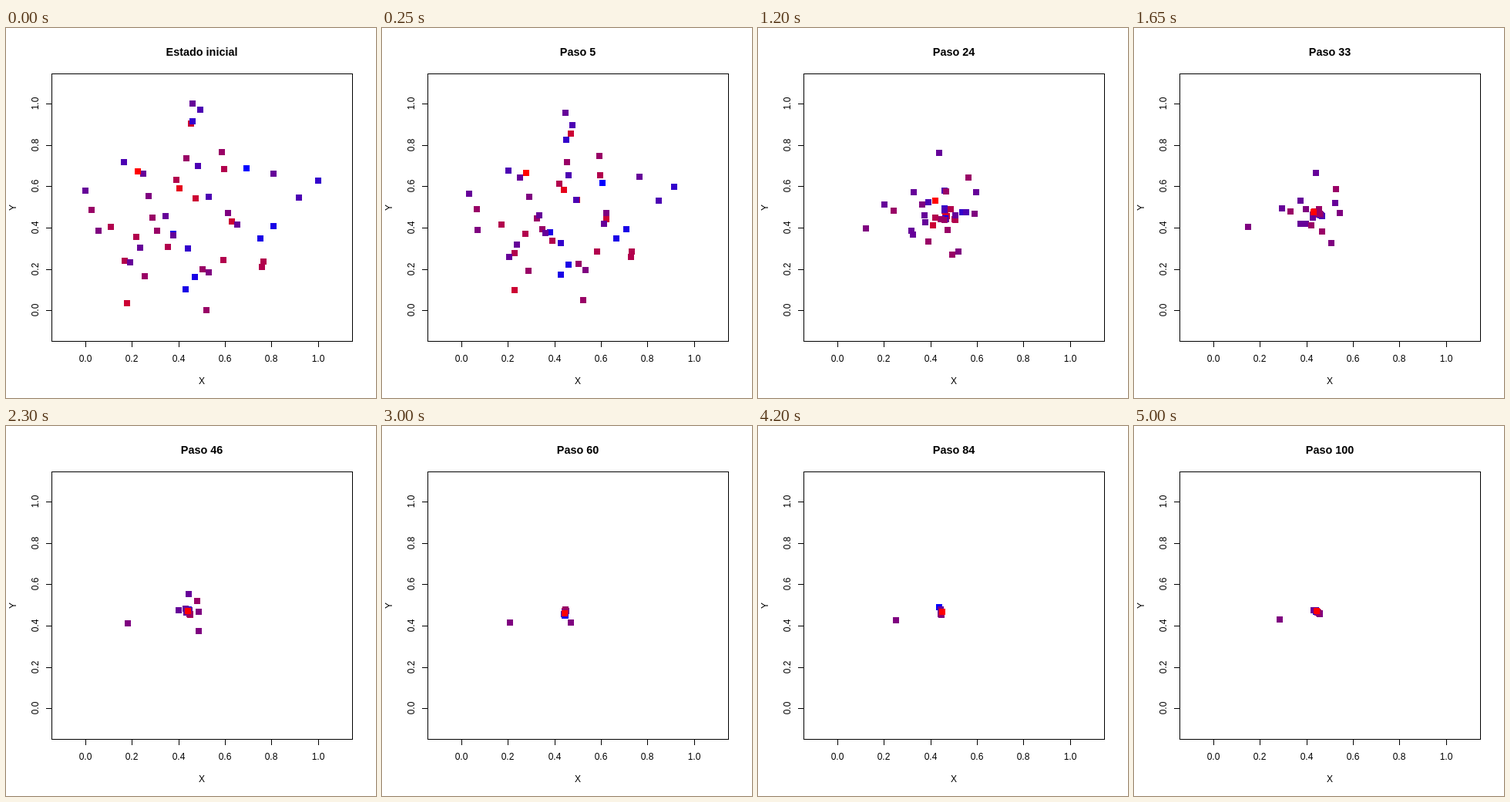
These frames come from a looping animation (480x480 px, 5050 ms). An HTML page with a canvas:

```html
<!DOCTYPE html>
<html lang="es">
<head>
<meta charset="utf-8">
<title>Partículas cargadas</title>
<style>
  html, body { margin: 0; width: 100%; height: 100%; overflow: hidden; background: #fff; }
  canvas { display: block; }
</style>
</head>
<body>
<canvas id="stage" width="480" height="480"></canvas>
<script>
const STEP_MS = 50, STEPS = 100, MAX_MOVE = 0.02, EPS = 0.001;
const X0 = 103.66, Y0 = 366.87, XS = 301.48, YS = 268.15;
const FONT = '"Liberation Sans", Arial, sans-serif';
const ctx = document.getElementById('stage').getContext('2d');

const toX = x => Math.floor(X0 + XS * x);
const toY = y => Math.floor(Y0 - YS * y);
const clamp = v => Math.max(0, Math.min(1, v));

// Starting particles in drawing order: stage x, stage y, charge from -5 (blue) to 5 (red)
const positive = [
  [240, 124, 2.8], [283, 183, 2], [136, 258, 2], [221, 197, 2], [225, 208, 4],
  [246, 221, 3], [293, 251, 3], [169, 271, 2], [210, 284, 2], [154, 302, 2.4],
  [282, 301, 2], [332, 310, 2], [334, 303, 2], [157, 357, 3.3]
];
const negative = [
  [252, 106, -2], [242, 121, -3], [153, 174, -1.75], [249, 179, -2], [312, 182, -5],
  [405, 198, -3], [380, 220, -2], [263, 219, -2], [347, 257, -4.4], [330, 273, -4.2],
  [217, 267, -4], [236, 286, -3], [245, 323, -4.2], [233, 339, -4.4]
];
const weak = [
  [242, 98, -1], [178, 189, -0.7], [234, 169, 1], [280, 161, 0.6], [347, 189, -1],
  [103, 211, -1], [111, 236, 0.9], [120, 263, 0.15], [185, 218, 0.4], [288, 240, 0.35],
  [300, 255, -0.85], [190, 246, 1], [207, 244, -0.8], [196, 263, 1.4], [217, 269, -0.8],
  [174, 285, -0.8], [161, 304, -1.1], [180, 322, 0.8], [255, 313, 0.9], [263, 317, 0.3],
  [260, 366, 1.1], [171, 186, 5]
];

const start = [...positive, ...negative, ...weak].map(([px, py, charge]) => ({
  x: clamp((px + 0.5 - X0) / XS),
  y: clamp((Y0 - py - 0.5) / YS),
  charge
}));

// Opposite charges attract and like charges repel, weighted by their difference
function forceOn(a, particles) {
  let fx = 0, fy = 0;
  for (const b of particles) {
    const dx = b.x - a.x, dy = b.y - a.y;
    const sign = a.charge * b.charge < 0 ? 1 : -1;
    const pull = sign * Math.abs(a.charge - b.charge) / (Math.hypot(dx, dy) + EPS);
    fx += dx * pull;
    fy += dy * pull;
  }
  return [fx, fy];
}

function advance(particles) {
  const forces = particles.map(p => forceOn(p, particles));
  const scale = MAX_MOVE / Math.max(...forces.flat().map(Math.abs));
  return particles.map((p, i) => ({
    x: clamp(p.x + scale * forces[i][0]),
    y: clamp(p.y + scale * forces[i][1]),
    charge: p.charge
  }));
}

const history = [start];
while (history.length <= STEPS) history.push(advance(history[history.length - 1]));

function label(text, x, y, turned = false) {
  ctx.save();
  ctx.translate(x, y);
  if (turned) ctx.rotate(-Math.PI / 2);
  ctx.fillText(text, 0, 0);
  ctx.restore();
}

function drawAxes() {
  ctx.strokeStyle = ctx.fillStyle = '#000';
  ctx.lineWidth = 1;
  ctx.strokeRect(59.5, 59.5, 390, 347);
  ctx.font = `12px ${FONT}`;
  for (let i = 0; i <= 5; i++) {
    const v = i / 5, x = toX(v), y = toY(v);
    ctx.fillRect(x, 407, 1, 7);
    ctx.fillRect(52, y, 7, 1);
    label(v.toFixed(1), x, 433);
    label(v.toFixed(1), 42, y, true);
  }
  label('X', 254, 462);
  label('Y', 13, 233, true);
}

function chargeColor(charge) {
  const red = Math.floor(25.5 * (Math.round(charge) + 5));
  return `rgb(${red}, 0, ${255 - red})`;
}

function draw(step) {
  ctx.fillStyle = '#fff';
  ctx.fillRect(0, 0, 480, 480);
  ctx.textAlign = 'center';
  drawAxes();
  ctx.font = `bold 14.4px ${FONT}`;
  label(step ? `Paso ${step}` : 'Estado inicial', 254, 36);
  for (const p of history[step]) {
    ctx.fillStyle = chargeColor(p.charge);
    ctx.fillRect(toX(p.x) - 4, toY(p.y) - 4, 8, 8);
  }
}

const begin = performance.now();
function tick() {
  const elapsed = performance.now() - begin;
  draw(Math.floor(elapsed / STEP_MS) % (STEPS + 1));
  requestAnimationFrame(tick);
}
tick();
</script>
</body>
</html>
```
